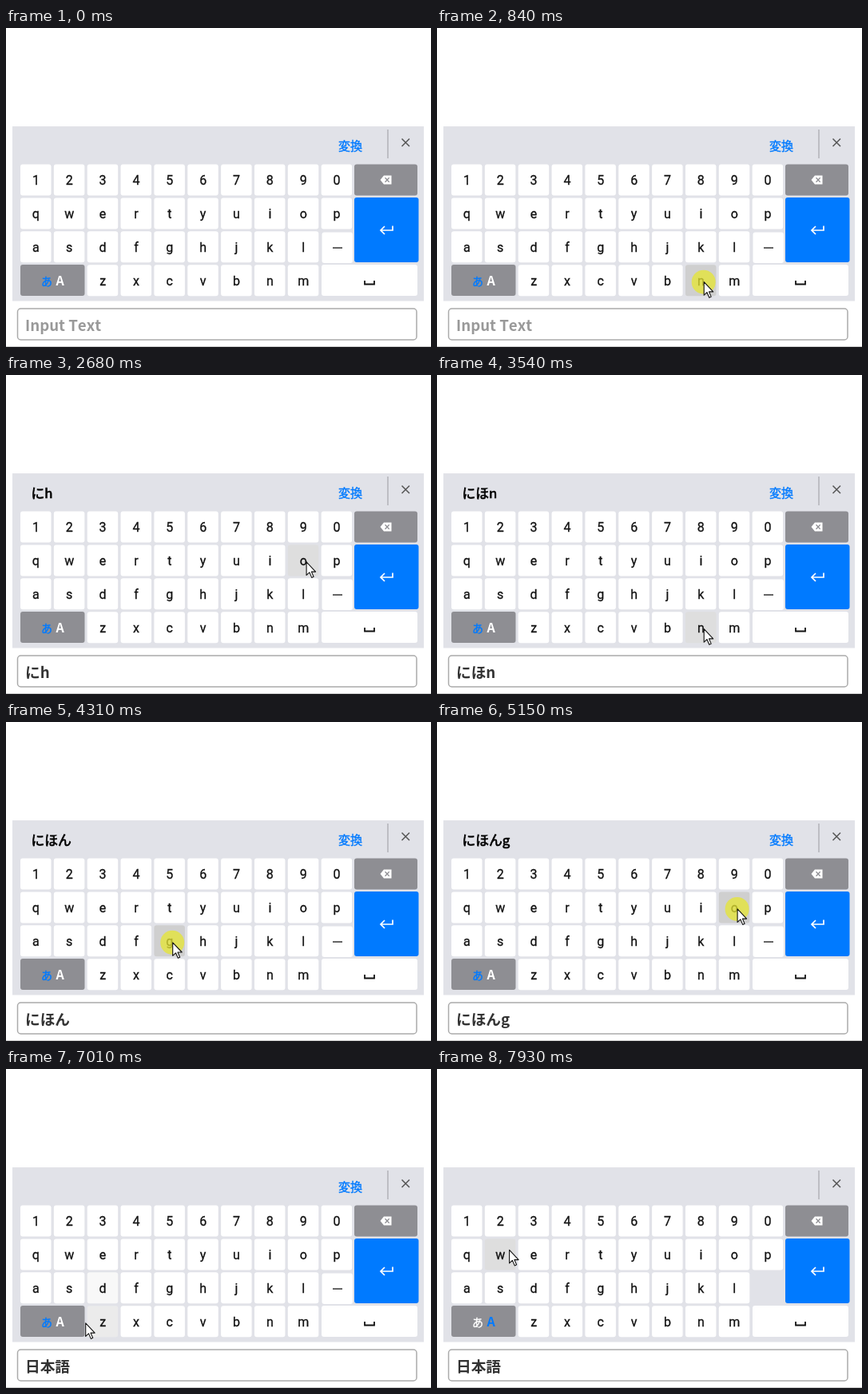
Write an HTML page that moves like this. It is 532x399 px and loops after 8000 ms.

```html
<!DOCTYPE html>
<html lang="ja">
<head>
<meta charset="utf-8">
<title>Kana keyboard</title>
<style>
html, body { margin: 0; width: 100%; height: 100%; overflow: hidden; background: #fff; }
svg { display: block; width: 532px; height: 399px; }
text {
  font-family: "Noto Sans CJK JP", "Noto Sans CJK", sans-serif;
  font-kerning: none;
  fill: currentColor; stroke: currentColor; stroke-width: .4;
}
.key { font: 16px Roboto, sans-serif; text-anchor: middle; color: #111; stroke-width: .3; }
.bold { font-weight: 700; stroke: none; }
.line { fill: none; stroke: #111; }
</style>
</head>
<body>
<svg viewBox="0 0 532 399" xmlns="http://www.w3.org/2000/svg">
  <g id="list">
    <rect x="12" y="0" width="507" height="123" fill="#e1e2e8"/>
    <g font-size="13.3" color="#222">
      <text x="28" y="33.500">日本後</text>
      <text x="28" y="72">ニホンゴ</text>
      <text x="28" y="110.500">日本語</text>
    </g>
  </g>
  <rect x="8" y="123" width="515" height="218.500" fill="#e1e2e8"/>
  <path id="edge" d="M8 123.500H523" stroke="#d6d7dd"/>
  <text id="preview" x="31.500" y="154.300" font-size="16.8" style="stroke-width:.7"></text>
  <text id="convert" x="416" y="153" font-size="15" color="#007aff">変換</text>
  <path d="M478 127V163" stroke="#b4b5ba" stroke-width="1.6"/>
  <path d="M495.500 138.500l9.500 9.500m0-9.500l-9.500 9.500" stroke="#555" stroke-width="1.5"/>

  <g id="keys"></g>
  <g id="dash">
    <rect x="395.500" y="255.500" width="38.500" height="38.500" rx="3" fill="#fff"/>
    <path class="line" d="M409 275H421" stroke-width="1.3"/>
  </g>
  <rect x="436" y="170.500" width="79" height="39" rx="3" fill="#8e8e93"/>
  <path d="M473 184.500H482.500V195.500H473L468.500 190Z" fill="#fff"/>
  <path d="M474.500 187.300l5.200 5.400m0-5.400l-5.200 5.400" stroke="#8e8e93" stroke-width="1.3"/>
  <rect x="436" y="212" width="80.500" height="81" rx="3" fill="#007aff"/>
  <path d="M484 247.500V253H469.500M474 248L469 253L474 258" fill="none" stroke="#fff" stroke-width="1.7"/>
  <rect x="18" y="296" width="80.500" height="39" rx="3" fill="#8e8e93"/>
  <text id="kana" x="44" y="322" font-size="14">あ</text>
  <text id="latin" class="bold" x="62.600" y="322" font-size="16">A</text>
  <rect x="395" y="296" width="120" height="39" rx="3" fill="#fff"/>
  <path class="line" d="M449 316V320.500H461V316" stroke-width="1.8"/>

  <rect x="14.500" y="351" width="499.500" height="39" rx="4" fill="#fff" stroke="#aaa" stroke-width="1.5"/>
  <text id="field" class="bold" x="24" y="379" font-size="18.7"></text>
  <path d="M0 398.500H532" stroke="#ccc"/>

  <g id="pointer">
    <circle id="halo" cx="-.5" cy="0" r="15" fill="#e6e632" fill-opacity=".75"/>
    <path d="M0 0V16.500L3.800 13L6.600 19.500L9 18.400L6.300 12.200H11.500Z" fill="#fff" stroke="#111" stroke-width="1.1" stroke-linejoin="round"/>
  </g>
</svg>
<script>
const LOOP = 8000, FIRST = 140, STEP = 77;   // the picture advances in even steps
const TRAVEL = 320, PRESS = 150, LAG = 75, FADE = 150;
const KEY_W = 38.5, KEY_H = 39;
const $ = id => document.getElementById(id);

// Pointer rests away from the letter keys
const spots = { start: [416, 400], convert: [430, 147], row: [175, 99], mode: [80, 318] };

// What the user does; a visit without a press only passes over the spot
const visits = [
  { at: 'start', arrive: 0 },
  { at: 'n', arrive: 460, press: 760, text: 'n' },
  { at: 'i', arrive: 1144, press: 1144, text: 'に' },
  { at: 'h', arrive: 1700, press: 2220, text: 'にh' },
  { at: 'o', arrive: 2550, press: 2845, text: 'にほ' },
  { at: 'n', arrive: 3230, press: 3375, text: 'にほn' },
  { at: 'n', arrive: 3600, press: 3600, text: 'にほん' },
  { at: 'g', arrive: 4000, press: 4295, text: 'にほんg' },
  { at: 'o', arrive: 4850, press: 5140, text: 'にほんご' },
  { at: 'convert', arrive: 5600, press: 5600 },
  { at: 'row', arrive: 6300, press: 6370, text: '日本語' },
  { at: 'z', arrive: 6920 },
  { at: 'mode', arrive: 7050, press: 7455 },
  { at: 'w', arrive: 7750 },
  { at: '3', arrive: 8180 }
];

function add(name, attrs) {
  const el = document.createElementNS('http://www.w3.org/2000/svg', name);
  for (const a in attrs) el.setAttribute(a, attrs[a]);
  return $('keys').appendChild(el);
}

const keys = [];
['1234567890', 'qwertyuiop', 'asdfghjkl', '  zxcvbnm'].forEach((row, r) => {
  [...row].forEach((char, c) => {
    if (char === ' ') return;
    const x = 18 + c * 41.85, y = 170.5 + r * 41.9;
    const box = add('rect', { x, y, width: KEY_W, height: KEY_H, rx: 3, fill: '#fff' });
    add('text', { x: x + 19.4, y: 195.6 + r * 42.1, class: 'key' }).textContent = char;
    keys.push({ x, y, box });
    spots[char] = [x + KEY_W / 2 + 4, y + KEY_H / 2 + 2];
  });
});

// Time the pointer is free to leave a visit
const free = v => v.press ? v.press + PRESS : v.arrive;

function tip(t) {
  const i = visits.findIndex(v => v.arrive > t);
  if (i < 1) return spots.start;
  const from = visits[i - 1], to = visits[i];
  const leave = Math.max(free(from), to.arrive - TRAVEL);
  const k = Math.max(0, (t - leave) / (to.arrive - leave));
  const [x0, y0] = spots[from.at], [x1, y1] = spots[to.at];
  return [x0 + (x1 - x0) * k, y0 + (y1 - y0) * k];
}

const inside = (key, [x, y]) =>
  x >= key.x && x <= key.x + KEY_W && y >= key.y && y <= key.y + KEY_H;

const show = (id, on) => $(id).setAttribute('visibility', on ? 'visible' : 'hidden');
const tint = (id, color) => $(id).setAttribute('color', color);

function draw(time) {
  const t = Math.max(0, FIRST + STEP * Math.floor((time - FIRST + 5) / STEP));
  const pos = tip(t);
  const down = visits.some(v => t >= v.press && t < v.press + PRESS);
  const done = visits.filter(v => t >= v.press + LAG);
  const text = done.reduce((s, v) => v.text || s, '');
  const did = at => done.some(v => v.at === at);
  const chosen = did('row'), open = did('convert') && !chosen, english = did('mode');

  // Hover level is the share of recent time spent over the key
  const trail = Array.from({ length: 10 }, (_, i) => tip(t - i * FADE / 10));
  for (const key of keys) {
    const level = trail.filter(p => inside(key, p)).length / trail.length;
    const g = Math.round(255 - 33 * level - (down && inside(key, pos) ? 15 : 0));
    key.box.setAttribute('fill', `rgb(${g},${g},${g})`);
  }

  $('preview').textContent = chosen ? '' : text;
  $('field').textContent = text || 'Input Text';
  tint('field', text ? '#333' : '#999');
  tint('kana', english ? '#fff' : '#007aff');
  tint('latin', english ? '#007aff' : '#fff');
  show('convert', !english);
  show('dash', !english);
  show('list', open);
  show('edge', open);
  show('halo', down);
  $('pointer').setAttribute('transform', `translate(${pos[0].toFixed(1)} ${pos[1].toFixed(1)})`);
}

const begin = performance.now();
function tick() {
  draw((performance.now() - begin) % LOOP);
  requestAnimationFrame(tick);
}
tick();
</script>
</body>
</html>
```
